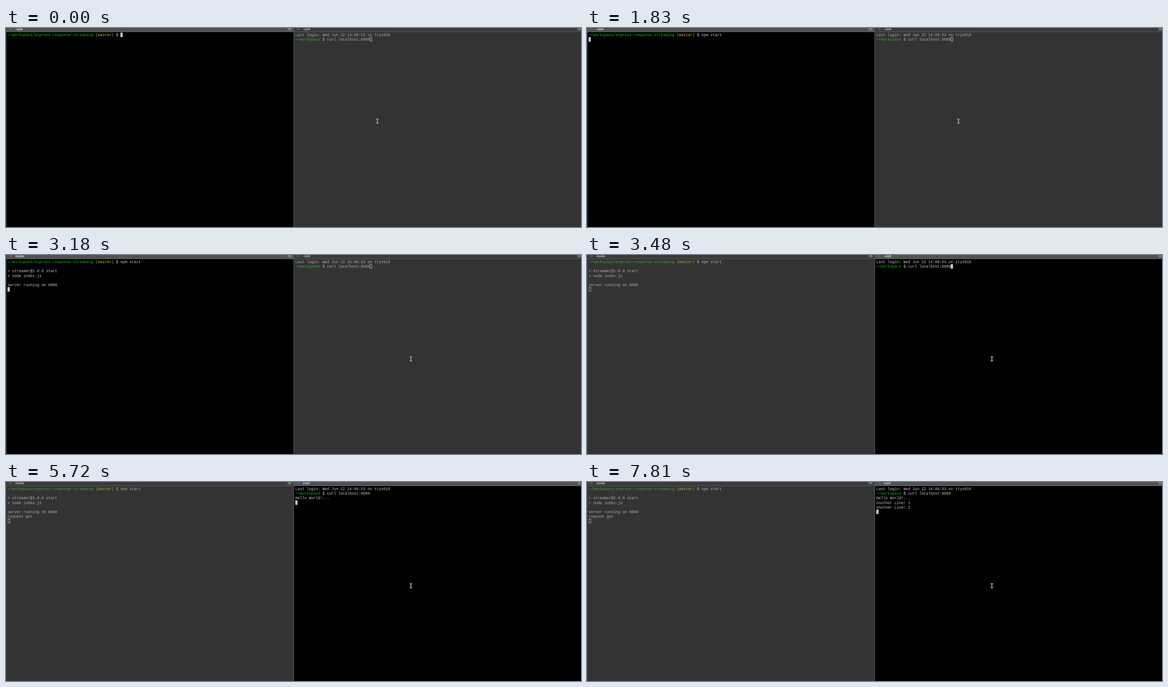
An HTML page with a canvas that plays this animation: 1271x440 px, repeating every 8000 ms.

```html
<!DOCTYPE html>
<html>
<head>
<meta charset="utf-8">
<title>Streaming terminal</title>
<style>
html, body { margin: 0; height: 100%; overflow: hidden; background: #000; }
canvas { display: block; }
</style>
</head>
<body>
<canvas id="stage" width="1271" height="440"></canvas>
<script>
const ctx = document.getElementById('stage').getContext('2d');
const LOOP = 8000, CHAR = 4.99, LINE = 10.14, TOP = 10.2;
const WHITE = '#c7c7c7', GREEN = '#00c200', YELLOW = '#c7c400';

function rect(x, y, w, h, color) {
  ctx.fillStyle = color;
  ctx.fillRect(x, y, w, h);
}

function text(str, x, y, color) {
  ctx.fillStyle = color;
  ctx.fillText(str, x, y);
}

// Title bar with close cross and menu icon
function drawBar(x, w, title, active) {
  rect(x, 0, w, 8, active ? '#525252' : '#3b3b3b');
  rect(x, 8, w, 1, active ? '#686868' : '#5a5a5a');
  ctx.strokeStyle = active ? '#808080' : '#909090';
  ctx.lineWidth = 0.7;
  ctx.beginPath();
  ctx.moveTo(x + 6.5, 0);
  ctx.lineTo(x + 12.5, 5);
  ctx.moveTo(x + 12.5, 0);
  ctx.lineTo(x + 6.5, 5);
  ctx.stroke();
  for (const y of [0, 2, 4]) rect(x + w - 13.5, y, 8.5, 1, '#979797');
  ctx.font = 'bold 7px "DejaVu Sans", sans-serif';
  text(title, x + 20.5, 5, active ? '#d4d4d4' : '#b0b0b0');
}

// Each line is a list of [string, color] runs; the caret follows the last run
function drawPane(x, w, lines, title, active) {
  const left = x + 3.6;
  rect(x, 9, w, 431, '#000');
  ctx.font = '8.32px "Liberation Mono", monospace';
  let column;
  lines.forEach((runs, row) => {
    column = 0;
    for (const [str, color = WHITE] of runs) {
      text(str, left + column * CHAR, Math.round(TOP + row * LINE + 8), color);
      column += str.length;
    }
  });
  const cx = left + column * CHAR, cy = TOP + (lines.length - 1) * LINE;
  if (active) {
    rect(cx - 0.2, cy, CHAR, 9.9, WHITE);
  } else {
    ctx.strokeStyle = WHITE;
    ctx.lineWidth = 1;
    ctx.strokeRect(Math.round(cx) + 0.5, Math.round(cy) + 0.5, 4, 9);
    rect(x, 9, w, 431, 'rgba(128,128,128,0.4)');
  }
  drawBar(x, w, title, active);
}

function drawPointer(x, y) {
  const beam = new Path2D('M-2.6-4.6Q0-4.6 0-2.6Q0-4.6 2.6-4.6M0-3V3M-2.6 4.6Q0 4.6 0 2.6Q0 4.6 2.6 4.6');
  ctx.save();
  ctx.translate(x, y);
  for (const [width, color] of [[2, '#d8d8d8'], [0.6, '#333']]) {
    ctx.lineWidth = width;
    ctx.strokeStyle = color;
    ctx.stroke(beam);
  }
  ctx.restore();
}

function leftLines(t) {
  const typed = t < 450 ? '' : t < 930 ? 'npm s' : 'npm start';
  const lines = [[['~/workspace/express-response-streaming', GREEN], [' (master)', YELLOW], [' $ ' + typed]]];
  if (t >= 2280) lines.push([], [['> streamer@1.0.0 start']], [['> node index.js']], []);
  if (t >= 2430) lines.push([['server running on 8080']]);
  if (t >= 4820) lines.push([['request got']]);
  if (t >= 1830) lines.push([]);
  return lines;
}

function rightLines(t) {
  const lines = [
    [['Last login: Wed Jun 22 14:08:53 on ttys019']],
    [['~/workspace', GREEN], [' $ curl localhost:8080']]
  ];
  if (t >= 5720) lines.push([['Hello World!...']]);
  if (t >= 6770) lines.push([['Another Line! 1']]);
  if (t >= 7810) lines.push([['Another Line! 2']]);
  if (t >= 4680) lines.push([]);
  return lines;
}

function pointerAt(t) {
  if (t < 2880) return [821, 206];
  if (t < 3030) return [863, 208.5];
  if (t < 3180) return [893, 226.5];
  return [895, 229.3];
}

function frame() {
  const t = performance.now() % LOOP;
  const leftActive = t < 3480;
  drawPane(0, 636, leftLines(t), t < 1980 ? '-zsh' : 'node', leftActive);
  drawPane(636, 640.5, rightLines(t), t < 5120 ? '-zsh' : 'curl', !leftActive);
  rect(0, 9, 1, 431, '#585858');
  rect(635.5, 0, 1, 440, '#686868');
  drawPointer(...pointerAt(t));
  requestAnimationFrame(frame);
}
frame();
</script>
</body>
</html>
```
